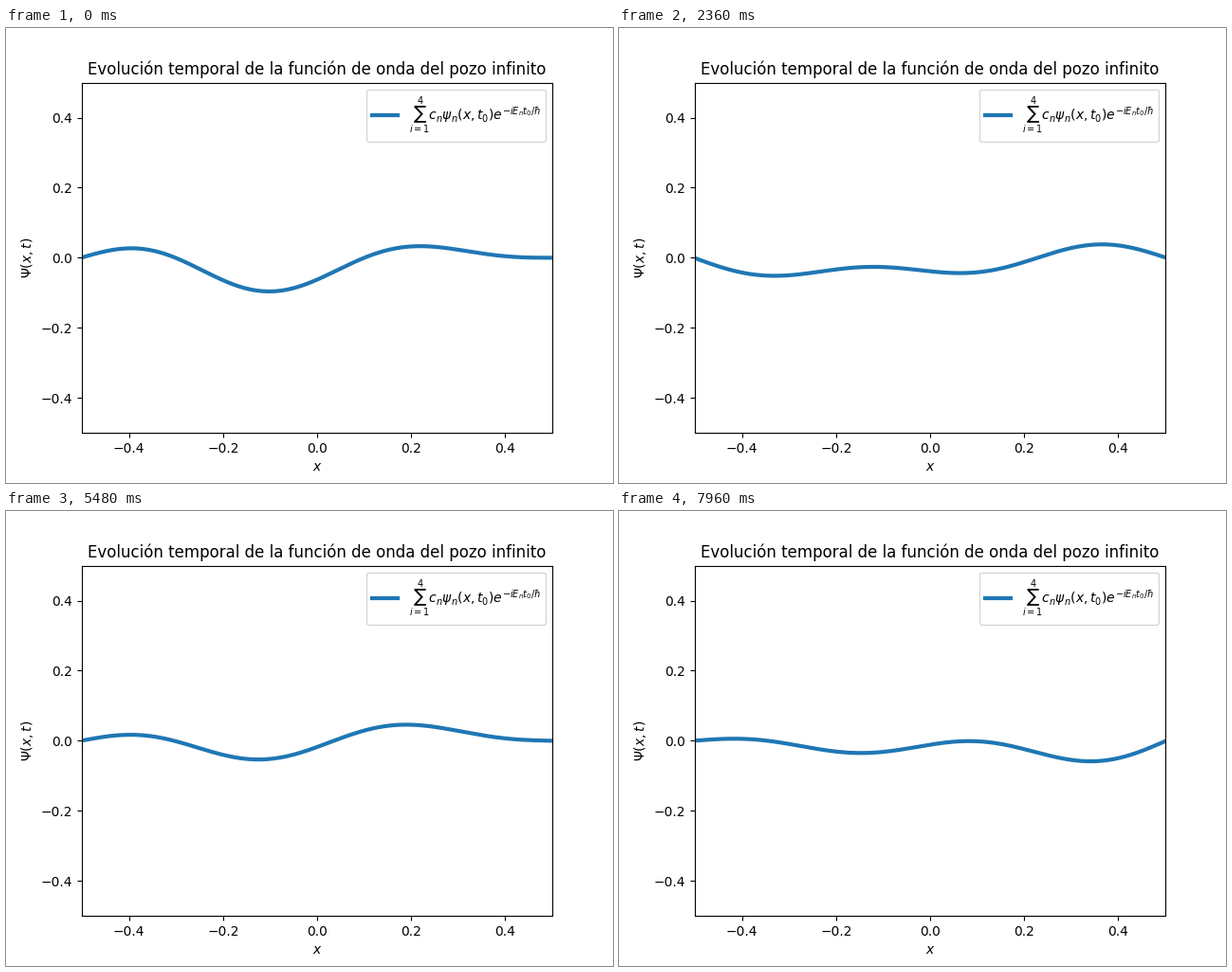
Write a matplotlib script that moves like this. It is 640 px wide and 480 px high and loops after 8 s.

```python
import numpy as np
import matplotlib.pyplot as plt
from matplotlib.animation import FuncAnimation

FRAMES = 200
INTERVAL = 40

# Infinite well on a grid: eigenpairs of the finite-difference Hamiltonian
N = 512
x = np.linspace(-0.5, 0.5, N)
h = x[1] - x[0]
n = np.arange(1, 5)
energy = (1 - np.cos(n * np.pi / (N + 1))) / h**2
signs = np.array([-1, -1, 1, 1])
grid = np.arange(1, N + 1)
modes = np.sqrt(2 / (N + 1)) * np.sin(np.outer(n, grid) * np.pi / (N + 1))
coef = 0.5 * signs


def psi(t):
    return (coef * np.cos(energy * t)) @ modes


fig, ax = plt.subplots(figsize=(6.4, 4.8), dpi=100)
line, = ax.plot(x, psi(0), lw=3,
                label=r"$\sum_{i=1}^4 c_n\psi_n(x,t_0)e^{-iE_nt_0/\hbar}$")
ax.set_xlim(-0.5, 0.5)
ax.set_ylim(-0.5, 0.5)
ax.set_xlabel("$x$")
ax.set_ylabel(r"$\Psi(x,t)$")
ax.set_title("Evolución temporal de la función de onda del pozo infinito")
ax.legend(loc="upper right")


def update(i):
    line.set_ydata(psi(i))
    return line,


anim = FuncAnimation(fig, update, frames=FRAMES, interval=INTERVAL,
                     repeat=True, repeat_delay=0)
plt.show()
```
